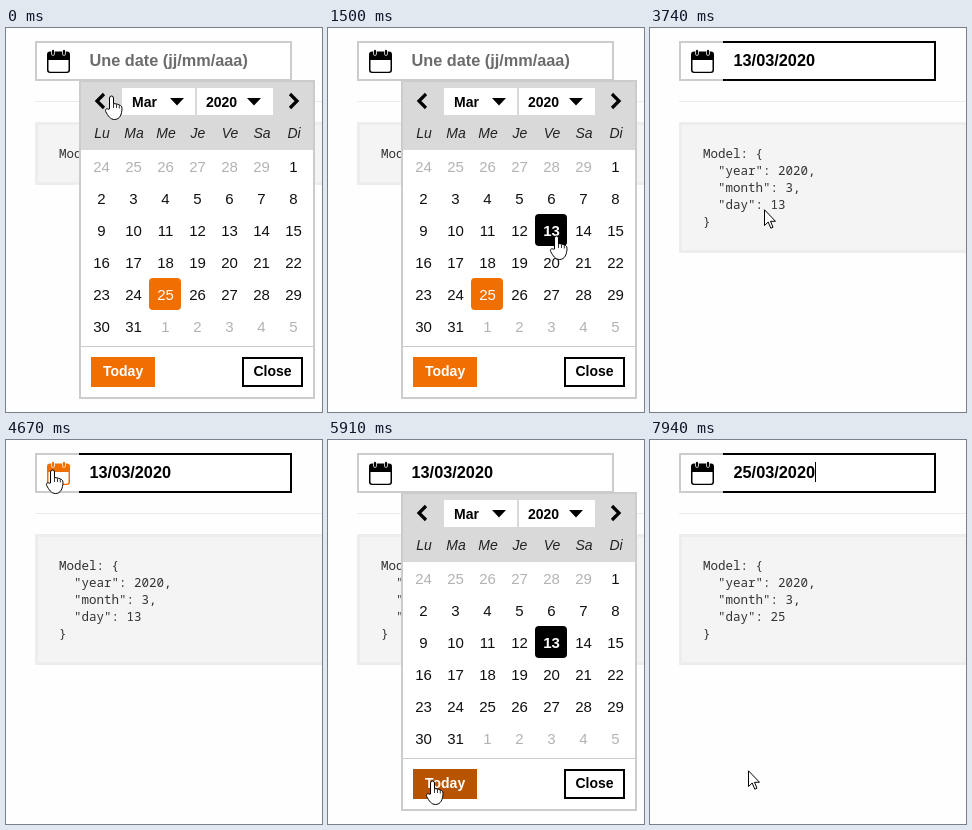
Recreate the animation shown at these times as an HTML page. Size 316x384 px, loop 8000 ms.

```html
<!DOCTYPE html>
<html lang="fr">
<head>
<meta charset="utf-8">
<title>Date picker</title>
<style>
  html, body { margin: 0; width: 100%; height: 100%; overflow: hidden; background: #fefefe; }
  svg { display: block; font-family: "Liberation Sans", Arial, sans-serif; }
  .bold { font-weight: 700; font-size: 14px; }
  .field { font-weight: 700; font-size: 16.3px; }
  .mono text { font: 12.5px "Noto Sans Mono", monospace; fill: #333; white-space: pre; }
  .week { font-style: italic; font-size: 14px; text-anchor: middle; fill: #222; }
  .day { font-size: 15px; text-anchor: middle; }
  .line { fill: none; stroke-width: 2; }
</style>
</head>
<body>
<svg width="316" height="384" viewBox="0 0 316 384">
  <path d="M29 73.5H316" stroke="#ebebeb"/>
  <rect id="pre" x="30.5" y="95.5" width="300" height="128" fill="#f4f4f4" stroke="#ededed" stroke-width="3"/>
  <g id="model" class="mono"></g>

  <rect x="30" y="14" width="255" height="38" fill="#fff" stroke="#ccc" stroke-width="2"/>
  <path id="focus" class="line" d="M73 14H285V52H73" stroke="#000"/>
  <g id="icon" stroke-linecap="round">
    <rect x="41" y="23.5" width="23" height="21.500" rx="3"/>
    <path d="M42.500 32H62.500V42Q62.500 43.800 60.700 43.800H44.300Q42.500 43.800 42.500 42Z" fill="#fff"/>
    <path d="M47 24V26M58 24V26" stroke="#fff" stroke-width="3.500"/>
    <path id="pins" d="M47 22.800V26M58 22.800V26" stroke-width="2"/>
  </g>
  <text id="value" class="field" x="83.500" y="38"></text>
  <path id="caret" d="M165.500 22V42" stroke="#000"/>

  <g id="popup">
    <rect x="74" y="53" width="234" height="317" fill="#fff" stroke="#ccc" stroke-width="2"/>
    <rect x="75" y="54" width="232" height="68" fill="#d9d9d9"/>
    <path d="M75 318.500H307" stroke="#ccc"/>
    <path d="M98 66L91 73L98 80M284 66L291 73L284 80" fill="none" stroke="#000" stroke-width="3.200"/>
    <path d="M116 60H189V87H116ZM191 60H267V87H191Z" fill="#fff"/>
    <path d="M164 70H178L171 77.500ZM241 70H255L248 77.500Z"/>
    <text class="bold" x="126" y="79">Mar</text>
    <text class="bold" x="200" y="79">2020</text>
    <g id="grid"></g>
    <rect id="today" x="86" y="330" width="62" height="28" stroke-width="2"/>
    <text class="bold" x="97" y="348" fill="#fff">Today</text>
    <rect class="line" x="237" y="330" width="59" height="28" stroke="#000"/>
    <text class="bold" x="247.500" y="348">Close</text>
  </g>

  <g id="cursor" fill="#fff" stroke="#000" stroke-linejoin="round">
    <path id="arrow" d="M.5 .8V16.500L4.200 13L6.800 19.200L9 18.200L6.500 12.300H11.500Z"/>
    <g id="hand">
      <path d="M-1.500 13V2a2 2 0 0 1 4 0V7.500q4 .3 7 2q1.700 1 1.500 3C10.800 18 9 23.500 3.500 23.500C-.5 23.500-3 20-5.300 15.500c-1-2 1-3.600 2.400-2.300Z"/>
      <path d="M2.500 7.500V12M5.500 8.500V12M8.300 9.500V12.500" stroke-width=".8"/>
    </g>
  </g>
</svg>
<script>
const LOOP = 8000, TICK = 137, BLINK = 515, CELL = 32, LEFT = 79, TOP = 122, ORANGE = '#f16e00';
const PICKED = 2080, REOPENED = 5260, RESET = 6710;
const $ = id => document.getElementById(id);
const show = (id, on) => $(id).setAttribute('display', on ? 'inline' : 'none');
const set = (id, name, v) => $(id).setAttribute(name, v);
const between = (t, a, b) => t >= a && t < b;
const inBox = ([x, y], l, t, w, h) => between(x, l, l + w) && between(y, t, t + h);

// Pointer path: time, x, y
const path = [
  [0, 105, 68], [390, 275, 205], [540, 277, 242], [820, 262, 264],
  [1100, 234, 226], [1500, 228, 208], [2350, 228, 208], [2600, 206, 228],
  [3150, 184, 262], [3480, 184, 262], [3970, 28, 80], [4110, 33, 32],
  [4400, 46, 30], [5200, 46, 30], [5890, 104, 341], [6300, 107, 348],
  [7810, 107, 348], [7940, 98, 330], [LOOP, 98, 330]
];

function pointer(t) {
  const q = Math.floor((t + 12) / TICK) * TICK;
  const i = path.findIndex(p => p[0] > q);
  const [t0, x0, y0] = path[i - 1], [t1, x1, y1] = path[i];
  const k = (q - t0) / (t1 - t0);
  return [Math.round(x0 + (x1 - x0) * k), Math.round(y0 + (y1 - y0) * k)];
}

// Calendar: 42 days starting on 24 February
const days = Array.from({ length: 42 }, (_, i) => ({
  x: LEFT + i % 7 * CELL,
  y: TOP + Math.floor(i / 7) * CELL,
  n: i < 6 ? 24 + i : (i - 6) % 31 + 1,
  other: i < 6 || i > 36
}));
$('grid').innerHTML =
  ['Lu', 'Ma', 'Me', 'Je', 'Ve', 'Sa', 'Di'].map((w, i) =>
    `<text class="week" x="${LEFT + 17 + i * CELL}" y="110">${w}</text>`).join('') +
  days.map((d, i) =>
    `<rect id="c${i}" x="${d.x}" y="${d.y}" width="32" height="32" rx="4"/>
     <text id="d${i}" class="day" x="${d.x + 16.5}" y="${d.y + 22}">${d.n}</text>`).join('');

function setDate(day) {
  const lines = day
    ? ['Model: {', '  "year": 2020,', '  "month": 3,', `  "day": ${day}`, '}']
    : ['Model: null'];
  $('model').innerHTML = lines.map((s, i) =>
    `<text x="53" y="${130 + i * 17}">${s}</text>`).join('');
  set('pre', 'height', lines.length * 17 + 43);
  $('value').textContent = day ? day + '/03/2020' : 'Une date (jj/mm/aaa)';
  set('value', 'fill', day ? '#000' : '#6c6c6c');
}

let shownDay;
function draw(t) {
  const at = pointer(t);
  const day = t < PICKED ? 0 : t < RESET ? 13 : 25;
  const open = t < PICKED || between(t, REOPENED, RESET);
  if (day !== shownDay) setDate(shownDay = day);

  const sinceFocus = t - (t < RESET ? PICKED : RESET);
  show('popup', open);
  show('caret', !open && Math.floor(sinceFocus / BLINK) % 2 === 0);
  show('focus', between(t, PICKED + 150, REOPENED - 170) || t >= RESET);
  const iconColor = between(t, 4120, REOPENED - 170) ? ORANGE : '#000';
  set('icon', 'fill', iconColor);
  set('pins', 'stroke', iconColor);

  let overDay = false;
  days.forEach((d, i) => {
    const hover = open && inBox(at, d.x, d.y, CELL, CELL);
    const dark = hover || day === 13 && d.n === 13;
    const bright = !day && d.n === 25 && !d.other;
    overDay ||= hover;
    set('c' + i, 'fill', dark ? '#000' : bright ? ORANGE : 'none');
    set('d' + i, 'fill', dark || bright ? '#fff' : d.other ? '#b3b3b3' : '#111');
    set('d' + i, 'font-weight', dark ? 700 : 400);
  });

  const overToday = open && inBox(at, 85, 329, 64, 30);
  const todayColor = overToday ? '#b85400' : ORANGE;
  set('today', 'stroke', todayColor);
  set('today', 'fill', t >= RESET - 150 ? '#a64b00' : todayColor);

  const overPrev = open && inBox(at, 79, 58, 33, 30);
  const hand = overDay || overToday || overPrev || inBox(at, 29, 13, 44, 40);
  show('hand', hand);
  show('arrow', !hand);
  set('cursor', 'transform', `translate(${at})`);
}

const start = performance.now();
function frame() {
  draw((performance.now() - start) % LOOP);
  requestAnimationFrame(frame);
}
frame();
</script>
</body>
</html>
```
